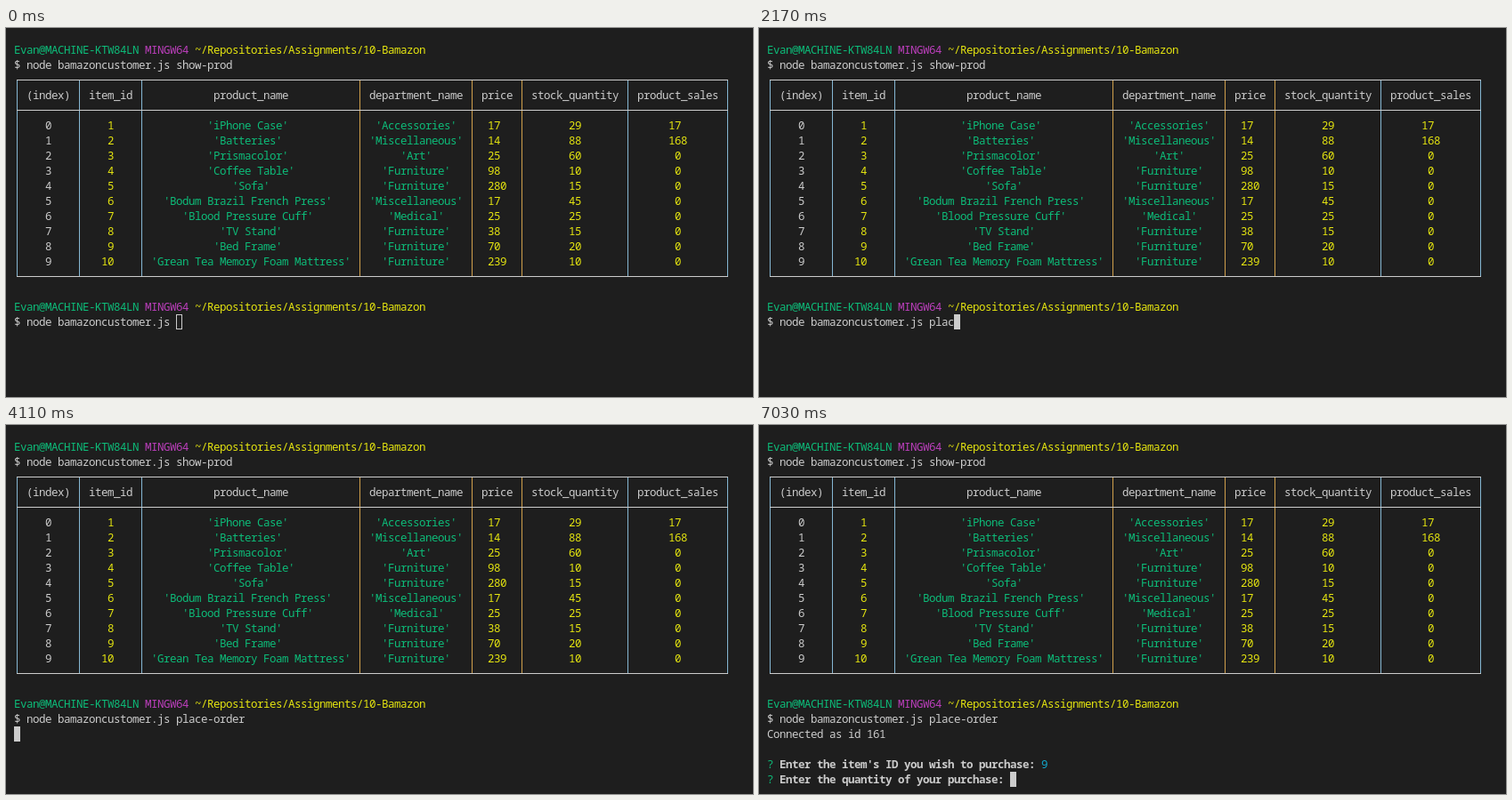
An HTML page with a canvas for the animation above (8000 ms loop, 839x415 px).

```html
<!DOCTYPE html>
<html lang="en">
<head>
<meta charset="utf-8">
<title>Terminal session</title>
<style>
  html, body { margin: 0; width: 100%; height: 100%; overflow: hidden; background: #1e1e1e; }
  canvas { display: block; }
</style>
</head>
<body>
<canvas id="stage" width="839" height="415"></canvas>
<script>
const ctx = document.getElementById('stage').getContext('2d', { alpha: false });
const LOOP = 8000, LEFT = 9, TOP = 16, CELL_W = 7, CELL_H = 17;
const BG = '#1e1e1e', FG = '#cccccc', GREEN = '#0dbc79', YELLOW = '#e5e510',
      MAGENTA = '#bc3fbc', CYAN = '#11a8cd', BLUE_EDGE = '#86b7d3', GOLD_EDGE = '#d0a04c';

const command = '$ node bamazoncustomer.js ';
const order = 'place-order';
// Time at which each letter of the order command appears
const keyTimes = [1930, 1990, 1990, 2170, 2400, 2460, 2720, 2920, 3100, 3270, 3430];

const headers = ['(index)', 'item_id', 'product_name', 'department_name', 'price', 'stock_quantity', 'product_sales'];
const products = [
  ['iPhone Case', 'Accessories', 17, 29, 17],
  ['Batteries', 'Miscellaneous', 14, 88, 168],
  ['Prismacolor', 'Art', 25, 60, 0],
  ['Coffee Table', 'Furniture', 98, 10, 0],
  ['Sofa', 'Furniture', 280, 15, 0],
  ['Bodum Brazil French Press', 'Miscellaneous', 17, 45, 0],
  ['Blood Pressure Cuff', 'Medical', 25, 25, 0],
  ['TV Stand', 'Furniture', 38, 15, 0],
  ['Bed Frame', 'Furniture', 70, 20, 0],
  ['Grean Tea Memory Foam Mattress', 'Furniture', 239, 10, 0]
];
const rows = products.map(([name, dept, ...nums], i) => [i, i + 1, `'${name}'`, `'${dept}'`, ...nums].map(String));
const widths = headers.map((h, c) => 2 + Math.max(h.length, ...rows.map(r => r[c].length)));
const edges = [0];
widths.forEach((w, i) => edges.push(edges[i] + w + 1));

const cellX = col => LEFT + col * CELL_W;
const cellY = row => TOP + row * CELL_H;

function rect(x, y, w, h, color) {
  ctx.fillStyle = color;
  ctx.fillRect(x, y, w, h);
}

// Writes text on the character grid and returns the next column
function write(row, col, text, color = FG, bold = false) {
  ctx.font = `${bold ? 'bold ' : ''}12.5px "Noto Sans Mono", monospace`;
  ctx.fillStyle = color;
  for (const ch of text) ctx.fillText(ch, cellX(col++), cellY(row) + 13);
  return col;
}

function prompt(row) {
  let col = write(row, 0, 'Evan@MACHINE-KTW84LN ', GREEN);
  col = write(row, col, 'MINGW64 ', MAGENTA);
  write(row, col, '~/Repositories/Assignments/10-Bamazon', YELLOW);
}

function question(row, text) {
  return write(row, write(row, 0, '? ', GREEN), text + ' ', FG, true);
}

function cursor(row, col, hollow) {
  const x = cellX(col), y = cellY(row);
  rect(x, y, CELL_W, CELL_H, FG);
  if (hollow) rect(x + 1, y + 1, CELL_W - 2, CELL_H - 2, BG);
}

function tableRow(row, cells, color) {
  cells.forEach((text, c) => {
    const pad = Math.floor((widths[c] - text.length) / 2);
    write(row, edges[c] + 1 + pad, text, color(c));
  });
}

function table() {
  tableRow(3, headers, () => FG);
  rows.forEach((r, i) => tableRow(5 + i, r, c => c === 0 ? FG : c === 2 || c === 3 ? GREEN : YELLOW));
  const x0 = cellX(0) + 3, y0 = cellY(2) + 8;
  edges.forEach((e, i) => rect(x0 + e * CELL_W, y0, 1, 13 * CELL_H, i > 2 && i < 6 ? GOLD_EDGE : BLUE_EDGE));
  for (const line of [0, 2, 13]) rect(x0, y0 + line * CELL_H, edges[7] * CELL_W + 1, 1, FG);
}

function draw(t) {
  rect(0, 0, 839, 415, BG);
  prompt(0);
  write(1, 0, command + 'show-prod');
  table();
  prompt(17);
  const typed = keyTimes.filter(k => t >= k).length;
  let row = 18, col = write(row, 0, command + order.slice(0, typed));
  if (t >= 4110) [row, col] = [19, 0];
  if (t >= 5140) {
    write(19, 0, 'Connected as id 161');
    row = 21;
    col = question(row, "Enter the item's ID you wish to purchase:");
  }
  if (t >= 6480) col = write(row, col, '9', t < 7030 ? FG : CYAN);
  if (t >= 7030) {
    row = 22;
    col = question(row, 'Enter the quantity of your purchase:');
  }
  cursor(row, col, t < 520 || (t >= 600 && t < 1090));
}

const start = performance.now();
function tick() {
  draw((performance.now() - start) % LOOP);
  requestAnimationFrame(tick);
}
tick();
</script>
</body>
</html>
```
